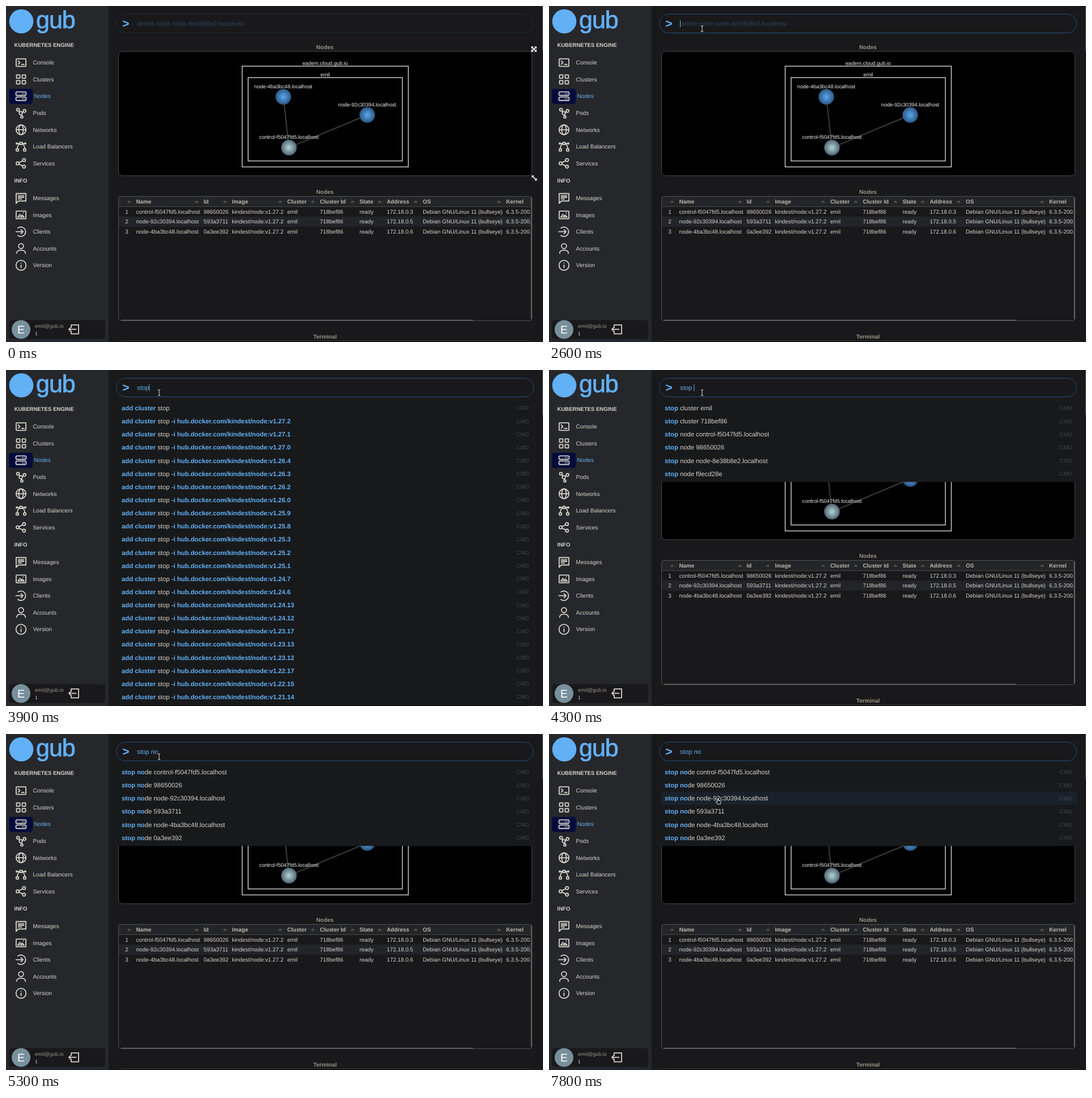
Animation, 947 px wide and 592 px high, one loop 8000 ms. Source, as an HTML page:

```html
<!DOCTYPE html>
<html lang="en">
<head>
<meta charset="utf-8">
<title>Nodes</title>
<style>
html, body { margin: 0; width: 100%; height: 100%; overflow: hidden; background: #19191b; }
svg { display: block; width: 100%; height: 100%; }
text { font-family: "Liberation Sans", Arial, sans-serif; white-space: pre; text-rendering: geometricPrecision; }
.ico { fill: none; stroke: #d6d2c9; stroke-width: 1.8; stroke-linejoin: round; stroke-linecap: round; }
</style>
</head>
<body>
<svg id="stage" viewBox="0 0 947 592" xmlns="http://www.w3.org/2000/svg"></svg>
<script>
const LOOP = 8000;
const BLUE = '#62b0f5', INK = '#d6d2c9', MUTED = '#9b9384', BG = '#19191b', SIDE = '#26272b';
const USER = 'emil', BRAND = 'gub';
const ROW = 23.14, LIST_TOP = 55.4;
const stage = document.getElementById('stage');

// Text placed by the vertical centre of its capitals.
const text = (x, cy, s, size, fill = INK, extra = '') =>
  `<text x="${x}" y="${(cy + size * 0.355).toFixed(2)}" font-size="${size}" fill="${fill}" ${extra}>${s}</text>`;
const rect = (x, y, w, h, r, fill, stroke = 'none', sw = 1) =>
  `<rect x="${x}" y="${y}" width="${w}" height="${h}" rx="${r}" fill="${fill}" stroke="${stroke}" stroke-width="${sw}"/>`;
const path = (d, extra = '') => `<path d="${d}" ${extra}/>`;
const ring = (x, y, r, extra = '') => `<circle cx="${x}" cy="${y}" r="${r}" ${extra}/>`;
const box = (x, y, w, h, r = 0.5) => `<rect x="${x}" y="${y}" width="${w}" height="${h}" rx="${r}"/>`;
const BOLD = 'font-weight="700"', MID = 'text-anchor="middle"';
const heading = (y, s) => text(562.5, y, s, 10.15, MUTED, BOLD + ' ' + MID);

const icons = {
  Console: box(-8.6, -6.6, 17.2, 13.2, 1) + path('M-5 -3l3 3-3 3M1 3.2h4.5'),
  Clusters: box(-8, -8, 6, 6) + box(2, -8, 6, 6) + box(-8, 2, 6, 6) + box(2, 2, 6, 6),
  Nodes: box(-9, -7.6, 18, 6.2, 2) + box(-9, 1.4, 18, 6.2, 2) + path('M2.5 -4.5h.1M5.5 -4.5h.1M2.5 4.5h.1M5.5 4.5h.1'),
  Pods: ring(-5.4, -5.8, 2.4) + ring(6.2, -3.6, 2.4) + ring(-0.4, 0.4, 2.8) + ring(1.4, 7, 2) +
    path('M-3.8 -4l1.6 2M2.2 -.9l1.9-1.3M.3 3.2l.5 1.9'),
  Networks: ring(0, 0, 8.6) + '<ellipse rx="4" ry="8.6"/>' + path('M-8.6 0h17.2'),
  'Load Balancers': box(-2, -7.5, 4, 4) + box(-8.5, 4, 4, 4) + box(4.5, 4, 4, 4) + ring(-7.5, -5.5, 1.1) + ring(7.5, -5.5, 1.1) +
    path('M-6.4 -5.5h4.4M2 -5.5h4.4M-2 -4.8C-5 -3.6 -6.5 0 -6.5 4M2 -4.8C5 -3.6 6.5 0 6.5 4'),
  Services: ring(-6, 0, 2.6) + ring(5.2, -5.8, 2.6) + ring(5.2, 5.8, 2.6) + path('M-3.7 -1.2l6.5-3.4M-3.7 1.2l6.5 3.4'),
  Messages: path('M-8.6 -8h17.2v13h-13.2l-4 4zM-5 -4.2h10M-5 -1.5h10M-5 1.3h6'),
  Images: box(-8.6, -6.8, 17.2, 13.6, 1) + path('M-5.6 3.8l3.6-4.6 2.4 3 1.8-2 3.4 3.6zM4 -3.6h.1'),
  Clients: path('M-5.5 -6.6a8.4 8.4 0 1 1 0 13.2M-9 0h12M0 -3.6l3.6 3.6-3.6 3.6'),
  Accounts: ring(0, -4.2, 4.4) + path('M-7.6 8.4v-1a6 5 0 0 1 6-4.4h3.2a6 5 0 0 1 6 4.4v1'),
  Version: ring(0, 0, 8.8) + path('M0 -.5v4.6M0 -4h.1'),
  Logout: path('M-4.5 -3.5v-4.4h13v15.8h-13v-4.4M4 0h-12.6M-5 -3.6l-3.6 3.6 3.6 3.6')
};
const icon = (name, x, y) => `<g class="ico" transform="translate(${x} ${y})">${icons[name]}</g>`;

function navItem(name, y) {
  const on = name === 'Nodes';
  return (on ? rect(5.5, 146, 41.5, 26.5, 4, '#030a3c') : '') + icon(name, 26.5, y) +
    text(on ? 49.5 : 47.5, y, name, 10.1, on ? BLUE : INK);
}

function sidebar() {
  const names = Object.keys(icons);
  return rect(0, 0, 181, 592, 0, SIDE) +
    ring(27, 27, 21.3, `fill="${BLUE}"`) +
    `<text x="53" y="38.5" font-size="43" letter-spacing="-1" fill="${BLUE}" stroke="${BLUE}" stroke-width=".8">${BRAND}</text>` +
    text(14.5, 69, 'KUBERNETES ENGINE', 9.55, INK, BOLD) +
    names.slice(0, 7).map((n, i) => navItem(n, 99.7 + i * 29.6)).join('') +
    text(14.5, 308, 'INFO', 9.55, INK, BOLD) +
    names.slice(7, 12).map((n, i) => navItem(n, 338.5 + i * 29.6)).join('') +
    rect(5.5, 553.5, 169.5, 33, 5, BG) +
    ring(26.5, 570, 16.5, 'fill="#78909c"') +
    text(26.5, 570, USER[0].toUpperCase(), 19.5, '#fff', MID) +
    text(51, 564, `${USER}@${BRAND}.io`, 9.1, MUTED) +
    text(51, 576.5, '1', 8.5) + icon('Logout', 119.5, 569.7);
}

function graph() {
  const label = (x, y, s) => text(x, y, s, 9.17, '#f0f0f0', MID);
  const ball = (x, y, g) => ring(x, y, 13.7, `fill="url(#${g})"`);
  return heading(72, 'Nodes') +
    rect(198.5, 80, 729, 219, 7, '#000', '#48484a') +
    rect(416.5, 106, 293, 177.5, 0, 'none', '#d4d4d4', 1.4) +
    rect(427, 126.2, 272, 146.8, 0, 'none', '#d4d4d4', 1.4) +
    path('M489 160L499 249.5L637 192', 'fill="none" stroke="#3c3c3c" stroke-width="2"') +
    ball(489, 160, 'blue') + ball(637, 192, 'blue') + ball(499, 249.5, 'pale') +
    label(563, 101, `eadem.cloud.${BRAND}.io`) + label(563, 121.2, USER) +
    label(489, 141.5, 'node-4ba3bc48.localhost') +
    label(637, 173.7, 'node-92c30394.localhost') +
    label(499, 230.6, 'control-f5047fd5.localhost');
}

function table() {
  const cols = [229.5, 348.5, 398.5, 496, 553.5, 623.5, 671.5, 735, 882];
  const heads = ['Name', 'Id', 'Image', 'Cluster', 'Cluster Id', 'State', 'Address', 'OS', 'Kernel'];
  const arrows = [217, 336.5, 386, 483.5, 541, 611, 659, 722.5, 869.5];
  const nodes = [['control-f5047fd5', '98650026', 3], ['node-92c30394', '593a3711', 5], ['node-4ba3bc48', '0a3ee392', 6]];
  const rows = nodes.map(([name, id, ip], i) => {
    const y = 362 + i * 17.8;
    const cells = [name + '.localhost', id, 'kindest/node:v1.27.2', USER, '718bef86', 'ready',
      '172.18.0.' + ip, 'Debian GNU/Linux 11 (bullseye)', '6.3.5-200.fc38'];
    return (i === 1 ? rect(199, 371, 728, 17.7, 0, '#232428') : '') +
      text(213, y, i + 1, 9.87, INK, MID) +
      cells.map((c, k) => text(cols[k], y, c, 9.87)).join('');
  }).join('');
  return heading(327.5, 'Nodes') +
    '<g clip-path="url(#cells)">' + rect(199, 336, 728, 17, 0, '#242528') +
    heads.map((h, k) => text(cols[k], 344, h, 9.87, '#bdb7ac', BOLD)).join('') +
    arrows.map(x => path(`M${x - 4} 346.6l4-4 4 4z`, 'fill="#55544f"')).join('') +
    rect(199, 353, 728, 0.8, 0, '#505050') + rows + '</g>' +
    rect(198.5, 335.5, 729, 219, 4, 'none', '#505052') +
    rect(925.6, 337, 1.8, 215, 1, '#62615e') + rect(203, 552.7, 621, 1.8, 1, '#62615e') +
    heading(582.3, 'Terminal') +
    rect(198.5, 590, 729, 30, 7, '#000', '#48484a');
}

const arrowCross = 'M-3.4 -3.4L3.4 3.4M3.4 -3.4L-3.4 3.4M-4 -1v-3h3M1 -4h3v3M4 1v3h-3M-1 4h-3v-3';
const arrowDiag = 'M-3.4 -3.4L3.4 3.4M-3.8 -.8v-3h3M3.8 .8v3h-3';
const grip = (d, x, y) => path(d, `transform="translate(${x} ${y})" fill="none" stroke="#f2f2f2" stroke-width="1.6"`);
const gradient = (id, a, b) => `<radialGradient id="${id}"><stop offset="0" stop-color="${a}"/>
  <stop offset="1" stop-color="${b}"/></radialGradient>`;
const beamPath = 'M-2 -5h1.2L0 -4.4L.8 -5H2M0 -4.4V4.4M-2 5h1.2L0 4.4L.8 5H2';

stage.innerHTML = `<defs>${gradient('blue', '#5aa8ee', '#2b5885')}${gradient('pale', '#b4d4dd', '#506870')}
  <clipPath id="cells"><rect x="199" y="336" width="727" height="217"/></clipPath></defs>
  ${rect(0, 0, 947, 592, 0, BG)}${sidebar()}${graph()}${table()}
  ${rect(946, 0, 1, 79, 0, '#66656a')}
  <g id="grips">${grip(arrowCross, 931, 76)}${grip(arrowDiag, 931.7, 303)}</g>
  <rect id="field" x="194.5" y="14.5" width="736" height="33" rx="16.5" fill="${BG}"/>
  ${text(205.3, 31, '&gt;', 21, BLUE, BOLD)}
  <g id="list"></g>
  <text id="entry" x="231" y="35" font-size="11.28"></text>
  <rect id="caret" y="25" width="1" height="12.4" fill="${BLUE}"/>
  <g id="beam" fill="none" stroke-linecap="square">
    ${path(beamPath, 'stroke="#000" stroke-width="2.6"')}${path(beamPath, 'stroke="#fff" stroke-width="1"')}
  </g>
  <g id="hand">${path('M-2 -5q1-.8 1.6 0v3l3.4.7q1.3.4 1.2 1.8L3.4 4.6H-1.6L-4.4 .8q0-1.2 1.2-.8l1.2 1z',
    'fill="#111" stroke="#fff" stroke-width=".9" stroke-linejoin="round"')}</g>`;
const el = Object.fromEntries(['grips', 'field', 'list', 'entry', 'caret', 'beam', 'hand']
  .map(id => [id, document.getElementById(id)]));

// Suggestions: each row is a list of [string, bold] runs.
const mark = (items, q) => items.map(s => {
  const i = s.indexOf(q);
  return [[s.slice(0, i), false], [q, true], [s.slice(i + q.length), false]];
});
const verbs = ['start cluster ', 'stop cluster ', 'delete cluster ', 'get clusters '];
const byUser = verbs.map(v => v + USER), byId = verbs.map(v => v + '718bef86');
const general = ['version', 'get cluster --all', 'get nodes --all', 'get networks --all', 'get images', 'delete clusters --all'];
const stopNodes = names => names.map(n => 'stop node ' + n);
const stopOld = ['stop cluster ' + USER, 'stop cluster 718bef86',
  ...stopNodes(['control-f5047fd5.localhost', '98650026', 'node-8e38b8e2.localhost', 'f9ecd28e'])];
const stopNew = stopNodes(['control-f5047fd5.localhost', '98650026', 'node-92c30394.localhost', '593a3711',
  'node-4ba3bc48.localhost', '0a3ee392']);
const tags = ('27.2 27.1 27.0 26.4 26.3 26.2 26.0 25.9 25.8 25.3 25.2 25.1 24.7 24.6 24.13 24.12 ' +
  '23.17 23.13 23.12 22.17 22.15 21.14').split(' ');
const addRows = ['', ...tags.map(t => '-i hub.docker.com/kindest/node:v1.' + t)]
  .map(s => [['add cluster', true], [' stop ', false], [s, true]]);

const typing = [
  [0, '', []],
  [3100, 's', mark([...general, ...byUser], 's')],
  [3400, 'st', mark([general[1], general[5], ...byUser, ...byId], 'st')],
  [3600, 'sto', mark(stopOld, 'sto')],
  [3900, 'stop', addRows],
  [4300, 'stop ', mark(stopOld, 'stop')],
  [4500, 'stop n', mark(stopNew, 'stop n')],
  [4800, 'stop no', mark(stopNew, 'stop no')]
];
const caretOn = [[2600, 5300], [5800, 6300], [7100, 7600]];
const track = [[1800, 269, 41], [2600, 270, 40], [5400, 270, 40], [6100, 306, 89], [7000, 306, 89], [7800, 299, 119]];

function pointer(t) {
  const i = track.findLastIndex(k => k[0] <= t);
  if (i < 0) return null;
  const a = track[i], b = track[i + 1] || a;
  const u = b === a ? 0 : (t - a[0]) / (b[0] - a[0]);
  const e = u * u * (3 - 2 * u);
  return [a[1] + (b[1] - a[1]) * e, a[2] + (b[2] - a[2]) * e];
}

function drawList(rows, hover) {
  if (!rows.length) return '';
  const run = ([s, bold]) => bold ? `<tspan fill="${BLUE}" ${BOLD}>${s}</tspan>` : s;
  return rect(195, 53, 736, rows.length * ROW + 5, 4, '#18191b', '#1c1d1f') +
    rows.map((r, i) => {
      const y = LIST_TOP + (i + 0.5) * ROW;
      return (i === hover ? rect(198, y - ROW / 2, 733, ROW, 0, '#19222c') : '') +
        text(204, y, r.map(run).join(''), 11.28) + text(900.3, y, 'CMD', 9.7, '#444547');
    }).join('');
}

const show = (node, on) => node.setAttribute('visibility', on ? 'visible' : 'hidden');
let lastKey = '';

function render(ms) {
  const t = Math.floor(ms / 100) * 100;
  const step = typing.findLastIndex(k => k[0] <= t);
  const [, entry, rows] = typing[step];
  const p = pointer(t);
  const onList = p && p[1] > 52;
  const hover = onList ? Math.floor((p[1] - 4 - LIST_TOP) / ROW) : -1;
  const key = step + ':' + hover;
  if (key !== lastKey) {
    lastKey = key;
    el.list.innerHTML = drawList(rows, hover);
    el.entry.textContent = entry || 'delete node node-8e38b8e2.localhost';
    el.entry.setAttribute('fill', entry ? '#62aeee' : '#2b455e');
    el.caret.setAttribute('x', 231 + (entry ? el.entry.getComputedTextLength() : 0));
  }
  el.field.setAttribute('stroke', t >= 2600 ? '#1f4f7a' : '#1b2c3e');
  show(el.grips, t < 1800);
  show(el.caret, caretOn.some(([a, b]) => t >= a && t < b));
  show(el.beam, p && !onList);
  show(el.hand, onList);
  if (p) (onList ? el.hand : el.beam).setAttribute('transform', `translate(${p[0]} ${p[1]})`);
}

const start = performance.now();
function tick() {
  render((performance.now() - start) % LOOP);
  requestAnimationFrame(tick);
}
tick();
</script>
</body>
</html>
```
